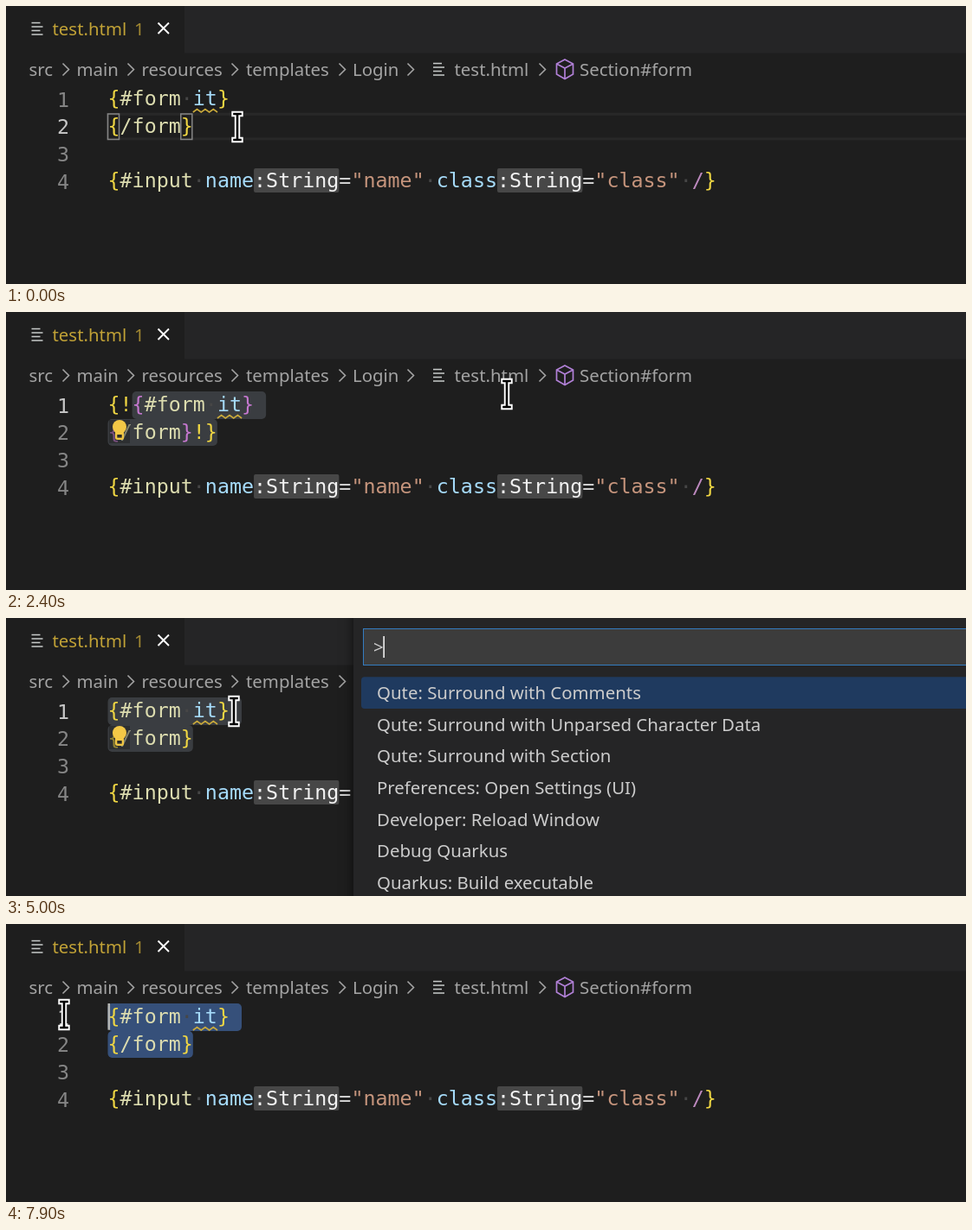
These frames come from a looping animation (1108 by 322 pixels, 8 s). An HTML page with a canvas:

```html
<!DOCTYPE html>
<html lang="en">
<head>
<meta charset="utf-8">
<title>Surround with command</title>
<style>
  html, body { margin: 0; width: 1108px; height: 322px; overflow: hidden; background: #1e1e1e; }
  canvas { display: block; }
</style>
</head>
<body>
<canvas id="stage" width="1108" height="322"></canvas>
<script>
const ctx = document.getElementById('stage').getContext('2d');
const LOOP = 8000, STEP = 100;
const CODE = '23.33px "DejaVu Sans Mono", monospace';
const UI = '20.4px "Noto Sans", sans-serif';
const X0 = 117.5, TOP = 92.2, CHAR = 14.046, LINE = 31.67;
const ROW_TOP = 68.3, ROW = 36.67;
const GOLD = '#f1d743', ORCHID = '#c678d0', FN = '#dcdcaf', VAR = '#a5daf9',
      STR = '#c5947c', PLAIN = '#d4d4d4', WARN = '#c0a136';

// Each line is a list of [text, colour, isHint] tokens.
const formLines = (brace, before = [], after = []) => [
  [...before, ['{', brace], ['#form', FN], ['·', '#464646'], ['it', VAR], ['}', brace]],
  [['{', brace], ['/form', FN], ['}', brace], ...after],
];
const DOCS = {
  plain: formLines(GOLD),
  comment: formLines(ORCHID, [['{!', GOLD]], [['!}', GOLD]]),
  raw: formLines(STR, [['{|', STR]], [['|}', STR]])
    .map(line => line.map(([s, c]) => [s, s === '·' ? c : STR])),
};
const INPUT_LINE = [
  ['{', GOLD], ['#input', FN], ['·', '#464646'], ['name', VAR], [':String', '#f2f2f2', true], ['=', PLAIN],
  ['"name"', STR], ['·', '#464646'], ['class', VAR], [':String', '#f2f2f2', true], ['=', PLAIN],
  ['"class"', STR], ['·', '#464646'], ['/', '#bd89bf'], ['}', GOLD],
];
const COMMANDS = [
  'Qute: Surround with Comments', 'Qute: Surround with Unparsed Character Data',
  'Qute: Surround with Section', 'Preferences: Open Settings (UI)',
  'Developer: Reload Window', 'Debug Quarkus', 'Quarkus: Build executable',
];
// Pointer path: time, x, y
const POINTER = [
  [0, 267, 140], [100, 268, 141], [200, 268, 141], [300, 218, 142], [400, 218, 142],
  [700, 72, 106], [800, 68, 105], [1300, 538, 150], [1500, 549, 126], [1600, 549, 126],
  [2000, 578, 95], [2800, 578, 95], [3100, 560, 132], [3200, 560, 132], [3700, 222, 140],
  [3800, 222, 140], [4100, 113, 117], [4300, 65, 106], [4400, 65, 106], [4500, 64, 106],
  [4600, 64, 106], [5000, 263, 108], [5100, 263, 108], [5400, 520, 39], [5600, 601, 125],
  [6400, 601, 125], [6600, 552, 149], [6900, 552, 149], [7300, 226, 140], [7500, 226, 140],
  [7900, 67, 105],
];

const within = (t, ...spans) => spans.some(([a, b]) => t >= a && t < b);
const clamp = (v, lo, hi) => Math.min(hi, Math.max(lo, v));
const colX = col => X0 + col * CHAR;
const lineY = i => Math.round(TOP + i * LINE);

function pointerAt(t) {
  const i = POINTER.findIndex(k => k[0] > t);
  if (i < 0) return POINTER.at(-1).slice(1);
  const [a, ax, ay] = POINTER[i - 1], [b, bx, by] = POINTER[i], p = (t - a) / (b - a);
  return [ax + (bx - ax) * p, ay + (by - ay) * p];
}

function rect(x, y, w, h, color, r = 0) {
  ctx.fillStyle = color;
  ctx.beginPath();
  ctx.roundRect(x, y, w, h, r);
  ctx.fill();
}
function text(s, x, y, color, font = UI) {
  ctx.font = font;
  ctx.fillStyle = color;
  ctx.fillText(s, x, y);
}
function stroke(path, color, width) {
  ctx.strokeStyle = color;
  ctx.lineWidth = width;
  ctx.stroke(new Path2D(path));
}

function fileIcon(x, y) {
  stroke(`M${x} ${y}h10M${x} ${y + 4.5}h13M${x} ${y + 9}h10M${x} ${y + 13.5}h13`, '#c8cbca', 1.5);
}

function drawTab(warning) {
  const shift = warning ? 0 : -20;
  rect(0, 0, 1108, 54.5, '#252526');
  rect(0, 0, 206 + shift, 55, '#1e1e1e');
  fileIcon(29.5, 19.5);
  text('test.html', 53.5, 34, warning ? WARN : '#fff');
  if (warning) text('1', 148, 34, '#a18832');
  stroke(`M${175.5 + shift} 19.5l12.5 12.5m0 -12.5l-12.5 12.5`, '#fff', 1.9);
}

function drawBreadcrumb(showSection) {
  const gray = '#a3a3a3';
  const parts = [['src', 26.5, 69], ['main', 81.5, 144], ['resources', 156.5, 264],
    ['templates', 277, 388], ['Login', 400, 467], ['test.html', 517.5, 619]];
  parts.forEach(([name, x, arrow], i) => {
    text(name, x, 81, gray);
    if (i < 5 || showSection) stroke(`M${arrow - 3.5} 66.5l7 7l-7 7`, gray, 1.6);
  });
  fileIcon(493, 66.5);
  if (!showSection) return;
  stroke('M645 62l9.5 5v12l-9.5 5.5l-9.5 -5.5v-12zM635.5 67l9.5 5l9.5 -5M645 72v12.5', '#b180d7', 1.7);
  text('Section#form', 662, 81, gray);
}

function drawTokens(tokens, line) {
  let col = 0;
  for (const [s, color, hint] of tokens) {
    if (hint) rect(colX(col), lineY(line) + 1, s.length * CHAR, 28, '#474747', 2);
    text(s, colX(col), 115 + line * LINE, color, CODE);
    col += s.length;
  }
}

function drawSquiggle(col) {
  stroke(`M${colX(col)} 123` + 'l4.7 -3.5l4.7 3.5'.repeat(3), '#c9a93b', 1.6);
}

function drawBulb() {
  rect(119, 125, 24, 27, 'rgba(30,30,30,.45)');
  rect(126, 136, 10, 12, '#efc544', 2.5);
  rect(128.3, 142, 5.4, 3.6, '#2a2a28');
  ctx.fillStyle = '#f3c846';
  ctx.beginPath();
  ctx.arc(131, 133, 8, 0, 7);
  ctx.fill();
}

function drawEditor(t, mx, my, palette) {
  const name = within(t, [2100, 3300]) ? 'comment' : within(t, [6100, 7100]) ? 'raw' : 'plain';
  const offset = name === 'plain' ? 0 : 2;
  const warning = !within(t, [3100, 3600], [6800, 7700]);
  const selected = !within(t, [0, 500], [3100, 3300], [7000, 7100]);
  const active = !palette && !within(t, [2000, 3100], [6000, 7000]);
  const dragging = within(t, [500, 900], [3800, 4200], [7600, 8000]);

  // Selection head; the anchor is the end of line 2.
  let headLine = selected ? 0 : 1, headCol = offset;
  if (dragging) {
    headLine = my < lineY(1) ? 0 : 1;
    headCol = clamp(Math.round((mx - X0) / CHAR), 0, headLine ? 7 : 10);
  }

  if (selected) {
    const color = active ? '#36507a' : '#3a3d41';
    if (headLine === 0) rect(colX(headCol), lineY(0), (11 + offset - headCol) * CHAR, 32, color, 5);
    const from = headLine ? headCol : 0;
    rect(colX(from), lineY(1), (7 + offset - from) * CHAR, 31, color, 5);
  } else {
    ctx.strokeStyle = '#282828';
    ctx.lineWidth = 3;
    ctx.strokeRect(X0, lineY(1) + 1.3, 1100, LINE - 3);
    if (name === 'plain') {
      ctx.strokeStyle = '#858585';
      ctx.lineWidth = 1.5;
      for (const col of [0, 6]) ctx.strokeRect(colX(col), lineY(1) + 1, CHAR - 1, 29.5);
    }
  }

  DOCS[name].forEach(drawTokens);
  drawTokens(INPUT_LINE, 3);
  for (let i = 0; i < 4; i++)
    text(i + 1, 59, Math.round(116.6 + i * LINE), i === headLine ? '#c6c6c6' : '#858585', CODE);
  if (warning) drawSquiggle(7 + offset);
  if (within(t, [1100, 3100], [3300, 6400])) drawBulb();
  if (selected && active) rect(colX(headCol), lineY(headLine), 2.6, LINE - 1, '#b4b6b5');

  drawTab(warning);
  drawBreadcrumb(!within(t, [2900, 3500], [6500, 7600]));
}

function drawPalette(mx, my) {
  ctx.save();
  ctx.shadowColor = 'rgba(0,0,0,.6)';
  ctx.shadowBlur = 13;
  rect(401, -10, 800, 400, '#252526');
  ctx.restore();
  rect(412, 12, 760, 43, '#3c3c3c', 2);
  ctx.strokeStyle = '#347cc0';
  ctx.lineWidth = 1;
  ctx.strokeRect(412.5, 12.5, 760, 42);
  text('>', 424, 41, '#ccc');
  rect(435.3, 21, 1.7, 25, '#e4e4e4');

  const hover = mx > 410 ? Math.floor((my - ROW_TOP) / ROW) : -1;
  COMMANDS.forEach((label, i) => {
    const y = ROW_TOP + i * ROW;
    if (i === 0) rect(410, y, 760, ROW, '#1f3a5f', 4);
    else if (i === hover) rect(410, y, 760, ROW, '#2b2d2e', 4);
    text(label, 428, Math.floor(y + 26.1), '#cccccc');
  });
}

function drawPointer(x, y, hand) {
  ctx.save();
  ctx.translate(x, y);
  if (hand) {
    const shape = 'M-2.5 2Q0 -2 2.5 2V10Q8 8 9 11Q14 9 15 12Q20 11 20 16V21L17 26V30H-2V26L-8 19Q-9 13 -2.5 17Z';
    ctx.lineJoin = 'round';
    stroke(shape, '#fff', 4);
    ctx.fillStyle = '#000';
    ctx.fill(new Path2D(shape));
    stroke('M3.5 16v4M8.5 16v4M13.5 17v4', '#777', 1);
  } else {
    const beam = 'M-3.5 -15H3.5M0 -15V15M-3.5 15H3.5';
    ctx.lineCap = 'square';
    stroke(beam, '#fff', 6.4);
    stroke(beam, '#000', 2.6);
  }
  ctx.restore();
}

function draw(t) {
  const palette = within(t, [1400, 2000], [4900, 6000]);
  const [mx, my] = pointerAt(t);
  rect(0, 0, 1108, 322, '#1e1e1e');
  drawEditor(t, mx, my, palette);
  if (palette) drawPalette(mx, my);
  drawPointer(mx, my, palette && mx > 401 && my > 60);
}

// The screen is refreshed ten times a second.
function tick() {
  draw(Math.floor(performance.now() % LOOP / STEP) * STEP);
  requestAnimationFrame(tick);
}
tick();
</script>
</body>
</html>
```
